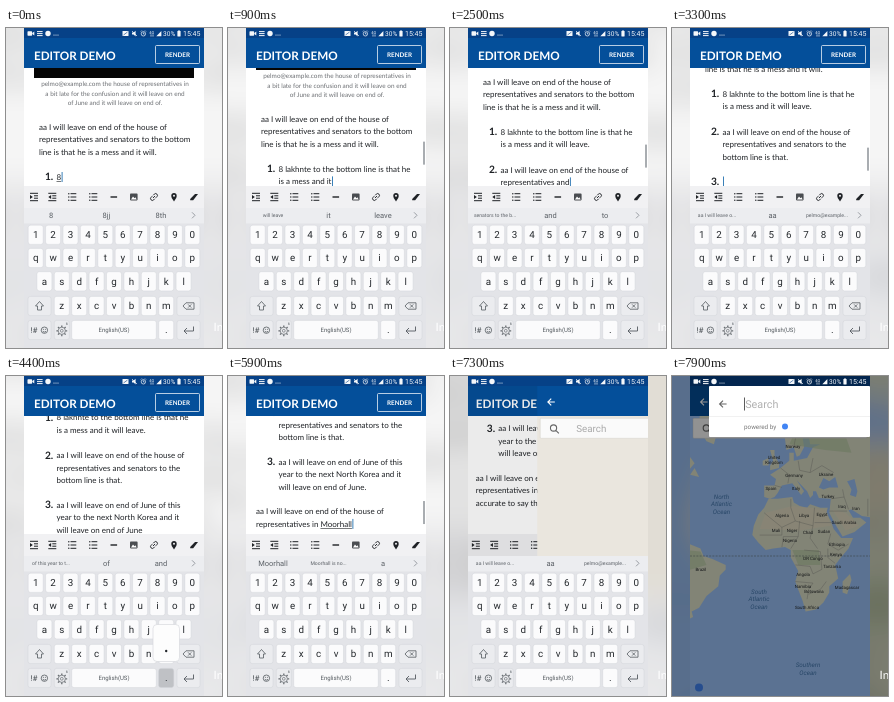
Recreate the animation shown at these times as an HTML page. Size 216 by 320 pixels, loop 8 s.

```html
<!DOCTYPE html>
<html lang="en">
<head>
<meta charset="utf-8">
<title>Editor demo</title>
<style>
html, body { margin: 0; width: 100%; height: 100%; overflow: hidden; background: #e8eaec; }
svg { display: block; width: 100vw; height: 100vh; }
text { font-family: Lato, sans-serif; text-rendering: geometricPrecision; white-space: pre; }
.ui { font-family: Roboto, sans-serif; }
</style>
</head>
<body>
<svg id="stage" viewBox="0 0 216 320"></svg>
<script>
const LOOP = 8000;
const LEFT = 18, WIDE = 180;
const BLUE = '#044f9a', NAVY = '#064187', INK = '#1f2226', KEY = '#fbfbfc', SIDE_KEY = '#ebecef';
const stage = document.getElementById('stage');

// ---- markup helpers
const rect = (x, y, w, h, fill, more = '') =>
  `<rect x="${x}" y="${y}" width="${w}" height="${h}" fill="${fill}" ${more}/>`;
const band = (y, h, fill, more) => rect(LEFT, y, WIDE, h, fill, more);
const text = (x, y, size, fill, s, more = '') =>
  `<text x="${x}" y="${y}" font-size="${size}" fill="${fill}" ${more}>${s}</text>`;
const line = (d, color, w = 1, more = '') =>
  `<path d="${d}" fill="none" stroke="${color}" stroke-width="${w}" ${more}/>`;
const shape = (d, fill) => `<path d="${d}" fill="${fill}"/>`;
const dot = (x, y, r, fill) => `<circle cx="${x}" cy="${y}" r="${r}" fill="${fill}"/>`;
const MID = 'text-anchor="middle"', UI = 'class="ui"';

// ---- the document being written
const FONT = 8, PITCH = 12.4, DROP = 2.8;
const blocks = [
  { x: 50.5, y: 149, num: 1, shift: [0, 8],
    lines: ['8 lakhnte to the bottom line is that he', 'is a mess and it will leave'] },
  { x: 50.5, y: 187, num: 2, shift: [33, 45, 58],
    lines: ['aa I will leave on end of the house of', 'representatives and senators to the', 'bottom line is that'] },
  { x: 50.5, y: 236.5, num: 3, shift: [83, 95, 107.5],
    lines: ['aa I will leave on end of June of this', 'year to the next North Korea and it', 'will leave on end of June'] },
  { x: 50.5, y: 286, num: 4, shift: [132], lines: [''] },
  { x: 28, y: 286, num: 0, shift: [138, 150.5, 184],
    lines: ['aa I will leave on end of the house of', 'representatives in Moorhall is not', 'accurate to say that'] }
];
blocks.forEach(b => {
  b.words = b.lines.flatMap((l, row) => l.split(' ').filter(Boolean).map(w => ({ w, row })));
});

// ---- typing timeline
const FRESH = ['aa I will leave o...', 'aa', 'pelmo@example...'];
const events = [];
const clip = s => s.length > 20 ? s.slice(0, 17) + '...' : s;
function put(t, b, n, tips) {
  const { words, shift } = blocks[b];
  const next = words.slice(n).map(o => o.w);
  const row = n ? words[Math.min(n, words.length) - 1].row : 0;
  if (!tips) {
    tips = n && n <= words.length
      ? [clip(next.slice(0, 5).join(' ')) || 'the', words[n - 1].w, next[1] || 'and'] : FRESH;
  }
  const prev = events[events.length - 1];
  const from = prev ? prev.shift : 0, to = shift[row];
  const moved = to !== from ? t : prev ? prev.moved : -LOOP;
  events.push({ t, b, n, row, from, shift: to, moved, tips });
}
function type(b, from, to, t0, t1) {
  for (let n = from; n <= to; n++) put(t0 + (t1 - t0) * (n - from) / (to - from), b, n);
}
put(0, 0, 1, ['8', '8jj', '8th']);
type(0, 2, 16, 100, 1000);
put(1200, 0, 17);
put(1400, 1, 0);
put(1600, 1, 1);
put(1800, 1, 2, ['I will leave on end of', 'I', 'ethi']);
type(1, 3, 19, 1900, 2900);
put(3000, 1, 20);
put(3200, 2, 0);
type(2, 1, 23, 3700, 4100);
put(4200, 2, 24, ['of this year to t...', 'of', 'and']);
put(4500, 2, 25);
put(4700, 3, 0);
put(4900, 4, 0);
type(4, 1, 12, 5000, 5750);
put(5800, 4, 13, ['Moorhall', 'Moorhall is no...', 'a']);
type(4, 14, 19, 6000, 6900);
put(7000, 4, 20);
const dotTaps = [1100, 2900, 4350, 6900];

// ---- editor screen
function documentMarkup() {
  const cap = (y, s) => text(109, y, 6.4, '#6c6f73', s, MID);
  const para = ['aa I will leave on end of the house of',
    'representatives and senators to the bottom', 'line is that he is a mess and it will.'];
  return rect(28, -40, 160, 90, '#050505')
    + cap(58.2, 'pelmo@example.com the house of representatives in')
    + cap(67.6, 'a bit late for the confusion and it will leave on end')
    + cap(77, 'of June and it will leave on end of.')
    + para.map((s, i) => text(33, 99 + i * PITCH + DROP, FONT, INK, s)).join('')
    + blocks.map((b, i) => `<g id="b${i}">`
      + (b.num ? text(47.3, b.y + DROP + .3, 10.2, INK, b.num + '.', 'font-weight="700" text-anchor="end"') : '')
      + b.lines.map((l, j) => text(b.x, b.y + j * PITCH + DROP, FONT, INK, '', `id="l${i}_${j}"`)).join('')
      + '</g>').join('')
    + rect(0, 0, 0, .6, INK, 'id="under"') + rect(0, 0, .9, 10, '#2472b0', 'id="caret"');
}

function toolbarMarkup() {
  const bars = x => line(`M${x - 4} 165.3H${x + 4}M${x} 167.8H${x + 4}M${x} 170.2H${x + 4}M${x - 4} 172.7H${x + 4}`, INK, 1);
  const list = x => line(`M${x - 2} 165.7H${x + 3.8}M${x - 2} 169H${x + 3.8}M${x - 2} 172.3H${x + 3.8}`, INK, 1)
    + [165.7, 169, 172.3].map(y => dot(x - 3.7, y, .7, INK)).join('');
  return band(158, 22, '#f1f1f3')
    + bars(28) + shape('M26.8 169L24 167.1V170.9Z', INK)
    + bars(46.3) + shape('M42.3 169L45.1 167.1V170.9Z', INK)
    + list(66.5) + list(87.5) + rect(104.5, 168.3, 6.6, 1.4, INK)
    + rect(124, 165.6, 7.6, 6.8, '#4a4d51', 'rx=".8"') + shape('M125 171.5L127 168.4L128.5 170.2L129.4 169.3L130.7 171.5Z', '#fff')
    + `<g transform="rotate(-45 148 169)">`
    + line('M147.4 167.2H145.7a1.8 1.8 0 0 0 0 3.6h1.7M148.6 167.2h1.7a1.8 1.8 0 0 1 0 3.6h-1.7M146.5 169h3', INK, .9) + '</g>'
    + shape('M168 173.4C166 170.8 165.3 169.3 165.3 167.8a2.7 2.7 0 0 1 5.4 0C170.7 169.3 170 170.8 168 173.4Z', INK) + dot(168, 167.7, 1, '#f1f1f3')
    + shape('M184.2 171L189 166H192L187.2 172.2H184.2Z', INK);
}

function keyboardMarkup() {
  const STEP = 17.4;
  const key = (x, y, w, fill = KEY, more = '') =>
    rect(x - w / 2, y - 9.6, w, 19.2, fill, `rx="2.4" stroke="#cdcfd4" stroke-width=".4" ${more}`);
  const row = (chars, y) => [...chars].map((c, i) => {
    const x = 108 + (i - (chars.length - 1) / 2) * STEP;
    return key(x, y, 15) + text(x, y + 3.3, 9.8, '#24282c', c, `${MID} ${UI}`);
  }).join('');
  const side = (x, y, w = 23) => key(x, y, w, SIDE_KEY);
  const tip = (i, x) => text(x, 190, 7.5, '#5b6066', '', `id="tip${i}" ${MID} ${UI}`);
  const spokes = [0, 45, 90, 135].map(a =>
    line('M55.8 297.4V299M55.8 306.6V308.2', '#6a6f74', 1.3, `transform="rotate(${a} 55.8 302.8)"`)).join('');
  return band(180, 140, '#e3e4e8') + band(180, 15.5, '#ecedf0')
    + tip(0, 45) + tip(1, 100.5) + tip(2, 155)
    + line('M186 184.3L189 187.3L186 190.3', '#858a90', .8)
    + row('1234567890', 206.8) + row('qwertyuiop', 230) + row('asdfghjkl', 253.3) + row('zxcvbnm', 278)
    + side(33.5, 278) + line('M33.5 273.5L37.5 278H35.5V282H31.5V278H29.5Z', '#555b60', .8)
    + side(182.5, 278) + line('M177 278L180 274.8H188V281.2H180ZM182.1 276.4l3.2 3.2m0-3.2l-3.2 3.2', '#555b60', .8)
    + side(33.5, 302) + text(24.5, 305, 8, '#444a4f', '!#', UI)
    + line('M41.6 302.2a3.2 3.2 0 1 1-6.4 0a3.2 3.2 0 1 1 6.4 0M36.8 303.3q1.6 1.7 3.2 0', '#555b60', .8)
    + dot(37.4, 301.2, .5, '#555b60') + dot(39.4, 301.2, .5, '#555b60')
    + side(55.8, 302, 15) + spokes
    + '<circle cx="55.8" cy="302.8" r="3.6" fill="none" stroke="#6a6f74" stroke-width=".8"/>'
    + '<circle cx="55.8" cy="302.8" r="1.4" fill="none" stroke="#6a6f74" stroke-width=".7"/>'
    + text(59.8, 296.8, 3.8, '#555b60', '6', UI)
    + key(108, 302, 84.6) + text(108, 304.2, 6, '#555b60', 'English(US)', `${MID} ${UI}`)
    + key(160.2, 302, 15, KEY, 'id="dotKey"') + text(160.2, 305, 10, '#24282c', '.', `${MID} ${UI}`)
    + side(182.5, 302) + line('M187.5 298.5V303H178M181 300L178 303L181 306', '#555b60', .9)
    + '<g id="popup">' + rect(147, 248.5, 26.5, 37, '#fdfdfd', 'rx="4" stroke="#d3d5da" stroke-width=".6"')
    + dot(160.2, 275, 1.2, '#24282c') + '</g>';
}

// ---- map screen: Mercator, outlines given as "lon,lat"
const DEG = 1.48;
const project = s => {
  const [lon, lat] = s.split(',').map(Number);
  const rad = Math.asinh(Math.tan(lat * Math.PI / 180));
  return `${(105.5 + DEG * lon).toFixed(1)} ${(180 - DEG * rad * 180 / Math.PI).toFixed(1)}`;
};
const trace = s => 'M' + s.split(' ').map(project).join('L');
const area = (fill, list) => shape(list.map(s => trace(s) + 'Z').join(''), fill);

const land = [
  '-6,36 0,36 10,37 11,34 15,32 20,31 22,33 29,31 34,31 33,28 36,23 38,18 43,12 51,12 48,5 42,-2 39,-6 41,-15 35,-20 35,-24 31,-30 26,-34 19,-35 17,-29 14,-22 12,-17 14,-10 9,-1 9,4 5,6 -3,5 -8,4 -13,9 -17,14 -16,20 -13,27 -9,31',
  '-9,37 -9,43 -2,43 -1,46 -5,48 2,51 8,54 8,57 11,57 11,54 20,55 24,59 29,60 22,60 21,63 25,66 17,62 18,59 15,56 13,55.5 11,59 6,58 5,62 14,68 25,71 40,67 65,69 65,25 57,26 50,30 48,29.5 51,25 56,25 60,22 52,16 44,13 39,21 35,28 36,36 28,36.5 26,40 24,40 24,38 22,36.5 20,40 13,45.5 18,40 16,38 10,44 3,43 0,39 -2,37 -5,36',
  '-5,50 1,51 1,53 -2,56 -2,58 -5,58 -3,54 -5,52', '-10,52 -6,52 -6,55 -10,54',
  '-24,65.5 -22,63.5 -18,63.4 -14,64.5 -15,66 -20,66', '-52,72 -53,65 -48,61 -43,60 -40,65 -25,69',
  '-62,9 -52,5 -50,0 -44,-2 -35,-6 -35,-9 -39,-13 -40,-20 -48,-26 -53,-33 -58,-35 -57,-38 -62,-40',
  '-59,48 -56,51 -53,47', '-64,59 -56,53 -60,50 -64,50', '49,-12 50,-16 47,-25 44,-24 44,-17'
];
const lakes = ['28,42 31,46.5 35,45 39,47 41,42 35,42 31,41', '47,45 52,46 54,40 53,37 49,38 50,41'];
const deserts = ['-12,18 -8,28 10,32 33,30 36,20 15,17', '37,30 46,28 55,20 46,17'];
const forests = ['10,4 28,4 29,-6 14,-6', '-62,4 -52,3 -48,-6 -62,-10', '8,60 13,65 30,68 45,64 50,57 32,58'];
const borders = [
  '9,36 9,31 12,23 24,20 25,31', '25,22 37,22', '-9,28 -5,25 3,19 12,23', '3,19 3,14 -12,14',
  '15,23 14,13 9,5', '24,20 22,12 27,5', '3,6 4,13 14,13', '36,15 34,8 41,4 48,8', '34,5 34,-1 39,-5',
  '12,-6 22,-7 24,-12 30,-9 29,3 18,4', '12,-17 24,-18 21,-22 20,-28', '21,-25 29,-22 33,-17',
  '2,51 8,48 7,44', '-2,43 3,42', '14,54 15,50 22,49 24,55', '22,49 30,52 38,49', '44,41 45,37 36,36',
  '45,37 48,30', '35,29 47,29', '61,36 61,26', '11,59 13,64 20,69'
];

function mapMarkup() {
  const sea = (x, y, ...rows) => rows.map((s, i) =>
    text(x, y + i * 7.5, 6.3, '#4377b0', s, `${MID} ${UI} font-style="italic"`)).join('');
  const names = 'Norway,121,72|United,102,83|Kingdom,102,88|Germany,122,101|Ukraine,154,100|Spain,99,114|Italy,124,114|Turkey,156,122|Iraq,170,132|Iran,184,134|Algeria,110,141|Libya,132,141|Egypt,150,140|Saudi Arabia,172,148|Mali,104,156|Niger,120,156|Chad,136,158|Sudan,152,157|Nigeria,118,166|Ethiopia,165,170|Kenya,164,180|DR Congo,141,184|Tanzania,160,192|Angola,131,200|Namibia,131,212|Botswana,142,217|Madagascar,175,213|South Africa,135,233|Brazil,29,195';
  const water = '#9cc4fa';
  return band(40, 280, water) + area('#dfe2cb', land)
    + `<g opacity=".6">${area('#f0e5c8', deserts)}${area('#b9d0a4', forests)}</g>` + area(water, lakes)
    + line(borders.map(trace).join(''), '#8f8f86', .4)
    + line('M18 180H198', '#555f62', .5, 'stroke-dasharray="2 1.2"')
    + names.split('|').map(s => {
      const [name, x, y] = s.split(',');
      return text(x, y, 4.4, '#202426', name, `${MID} ${UI}`);
    }).join('')
    + sea(49.5, 122.5, 'North', 'Atlantic', 'Ocean') + sea(87, 217.5, 'South', 'Atlantic', 'Ocean')
    + sea(136, 291, 'Southern', 'Ocean') + dot(27, 311.5, 4, '#4285f4');
}

const arrow = (x, y, c) => line(`M${x + 3.6} ${y}H${x - 3}M${x} ${y - 3.4}L${x - 3.4} ${y}L${x} ${y + 3.4}`, c, 1.1);

function pageMarkup() {
  return band(40, 280, '#eae6de') + `<g id="map">${mapMarkup()}</g>`
    + band(10, 30, BLUE) + arrow(32, 26, '#fff')
    + rect(21, 42.3, 174, 20, '#fafafa', 'rx="1" stroke="#c9c7c3" stroke-width=".4"')
    + line('M37.4 52a3.1 3.1 0 1 1-6.2 0a3.1 3.1 0 1 1 6.2 0M36.6 54.3L39.6 57.3', '#666', 1.1)
    + text(57, 56.2, 9.8, '#aaa', 'Search', UI);
}

function dialogMarkup() {
  return band(0, 320, '#000', 'opacity=".42"')
    + rect(37, 10, 161, 51, '#fff', 'rx="1"') + arrow(51, 28, '#666')
    + rect(72, 21.5, .8, 13, '#333') + text(73.2, 31.8, 10.8, '#b0b0b0', 'Search', UI)
    + rect(37, 40.3, 161, .5, '#e2e2e2')
    + text(72, 52.5, 6.3, '#777', 'powered by', UI) + dot(113, 50.5, 3, '#4285f4');
}

function statusMarkup() {
  const w = '#f4f7fa';
  return rect(21.5, 3.3, 4.6, 4.4, w, 'rx=".6"') + shape('M26.3 5L28.3 3.6V7.4L26.3 6Z', w)
    + line('M31 3.6H36.6M31 5.6H36.6M31 7.6H36.6', w, 1)
    + dot(42, 5.5, 2.7, w) + [48, 50, 52].map(x => dot(x, 7, .6, w)).join('')
    + rect(116.5, 3, 6, 5, w, 'rx=".6"') + line('M117.5 7L121.5 4', NAVY, .6)
    + shape('M126 4.6h1.6l2-1.8v5.6l-2-1.8H126Z', w) + line('M126 3L131 8', w, .7)
    + line('M139.6 5.8a2.2 2.2 0 1 1-4.4 0a2.2 2.2 0 1 1 4.4 0M137.4 4.4V6H138.6M134.8 3.5l1-1M140 3.5l-1-1', w, .7)
    + text(143.3, 6, 4, w, '4G', UI) + line('M145 6.4V8.6M147 6.4V8.6', w, .7)
    + shape('M150.3 8.3H155.4V3Z', w)
    + text(157, 8.3, 6.6, w, '30%', UI) + rect(171.4, 3, 3.2, 5.4, w, 'rx=".4"') + rect(172.3, 2.3, 1.4, 1, w)
    + text(177, 8.4, 7, w, '15:45', UI);
}

stage.innerHTML = `<defs>
  <clipPath id="screen"><rect x="${LEFT}" width="${WIDE}" height="320"/></clipPath>
  <filter id="blur" filterUnits="userSpaceOnUse" x="-60" y="-60" width="336" height="440"><feGaussianBlur stdDeviation="15"/></filter>
  </defs>
  <g filter="url(#blur)"><use href="#phone" transform="translate(108 160) scale(3.16) translate(-108 -160)"/></g>
  ${rect(0, 0, 216, 320, '#000', 'opacity=".04"')}
  ${text(207.5, 302.5, 11.5, '#fff', 'In')}
  <g id="phone" clip-path="url(#screen)">
    ${band(0, 320, '#fff')}
    <g id="app"><g id="doc">${documentMarkup()}</g>
      ${rect(195, 0, 2, 23, '#a9adb1', 'id="bar"')}
      ${rect(10, 10, 200, 30, BLUE)}
      ${text(28, 31.8, 11.7, '#fff', 'EDITOR DEMO', 'font-weight="700"')}
      ${rect(149.5, 17.5, 44, 18, BLUE, 'rx="1" stroke="#e6eef6" stroke-width=".8"')}
      ${text(171.5, 28.8, 6.3, '#fff', 'RENDER', `${MID} font-weight="700"`)}
      ${toolbarMarkup()}</g>
    ${band(10, 310, '#000', 'id="shade"')}
    <g id="page">${pageMarkup()}</g>
    <g id="keys">${keyboardMarkup()}</g>
    ${band(0, 10, NAVY)}
    <g id="dialog">${dialogMarkup()}</g>
    ${statusMarkup()}
  </g>`;

// ---- animation
const $ = id => document.getElementById(id);
const set = (id, o) => { for (const k in o) $(id).setAttribute(k, o[k]); };
const show = (id, on) => set(id, { visibility: on ? 'visible' : 'hidden' });
const prog = (t, a, b) => Math.max(0, Math.min(1, (t - a) / (b - a)));
const easeOut = p => 1 - (1 - p) ** 3;
let shown = -1;

function drawText(e) {
  blocks.forEach((b, i) => {
    const n = i < e.b ? b.words.length + 1 : i === e.b ? e.n : 0;
    $('b' + i).style.display = i > e.b || (i === 3 && e.b !== 3) ? 'none' : '';
    b.lines.forEach((l, row) => {
      const part = b.words.slice(0, n).filter(o => o.row === row).map(o => o.w).join(' ');
      const end = n > b.words.length && row === b.lines.length - 1 ? '.' : '';
      $(`l${i}_${row}`).textContent = part + end;
    });
  });
  const b = blocks[e.b], node = $(`l${e.b}_${e.row}`), y = b.y + e.row * PITCH;
  const w = node.getComputedTextLength();
  set('caret', { x: b.x + w + .5, y: y - 5 });
  const marked = e.t === 0 || e.tips[0] === 'Moorhall';
  let from = 0;
  if (marked && e.t) from = node.getSubStringLength(0, node.textContent.lastIndexOf(' ') + 1);
  set('under', { x: b.x + from, y: y + 4.2, width: marked ? w - from : 0 });
  e.tips.forEach((s, i) => {
    const small = s.length > 9;
    $('tip' + i).textContent = s;
    set('tip' + i, { 'font-size': small ? 5.1 : 7.5, y: small ? 189.2 : 190 });
  });
}

function render(t) {
  let i = events.length - 1;
  while (i && events[i].t > t) i--;
  const e = events[i];
  if (i !== shown) { drawText(e); shown = i; }

  const shift = e.from + (e.shift - e.from) * easeOut(prog(t, e.t, e.t + 90));
  set('doc', { transform: `translate(0 ${-shift})` });
  set('bar', { y: 113 + shift * .08 });
  show('bar', t - e.moved < 300);

  const tap = dotTaps.some(a => t >= a && t < a + 200);
  show('popup', tap);
  set('dotKey', { fill: tap ? '#bfc1c5' : KEY });
  show('caret', !tap && !(t >= 3500 && t < 3690) && t < 7200);

  const slide = easeOut(prog(t, 7200, 7585));
  set('app', { transform: `translate(${-3.5 * slide} 0)` });
  set('shade', { opacity: .13 * slide });
  set('page', { transform: `translate(${WIDE * (1 - slide)} 0)` });
  set('map', { opacity: prog(t, 7480, 7700) });
  set('keys', { transform: `translate(0 ${145 * prog(t, 7380, 7580) ** 1.5})` });
  show('dialog', t >= 7860);
}

function tick(now) {
  render((now + 4) % LOOP);
  requestAnimationFrame(tick);
}
render(0);
requestAnimationFrame(tick);
</script>
</body>
</html>
```
